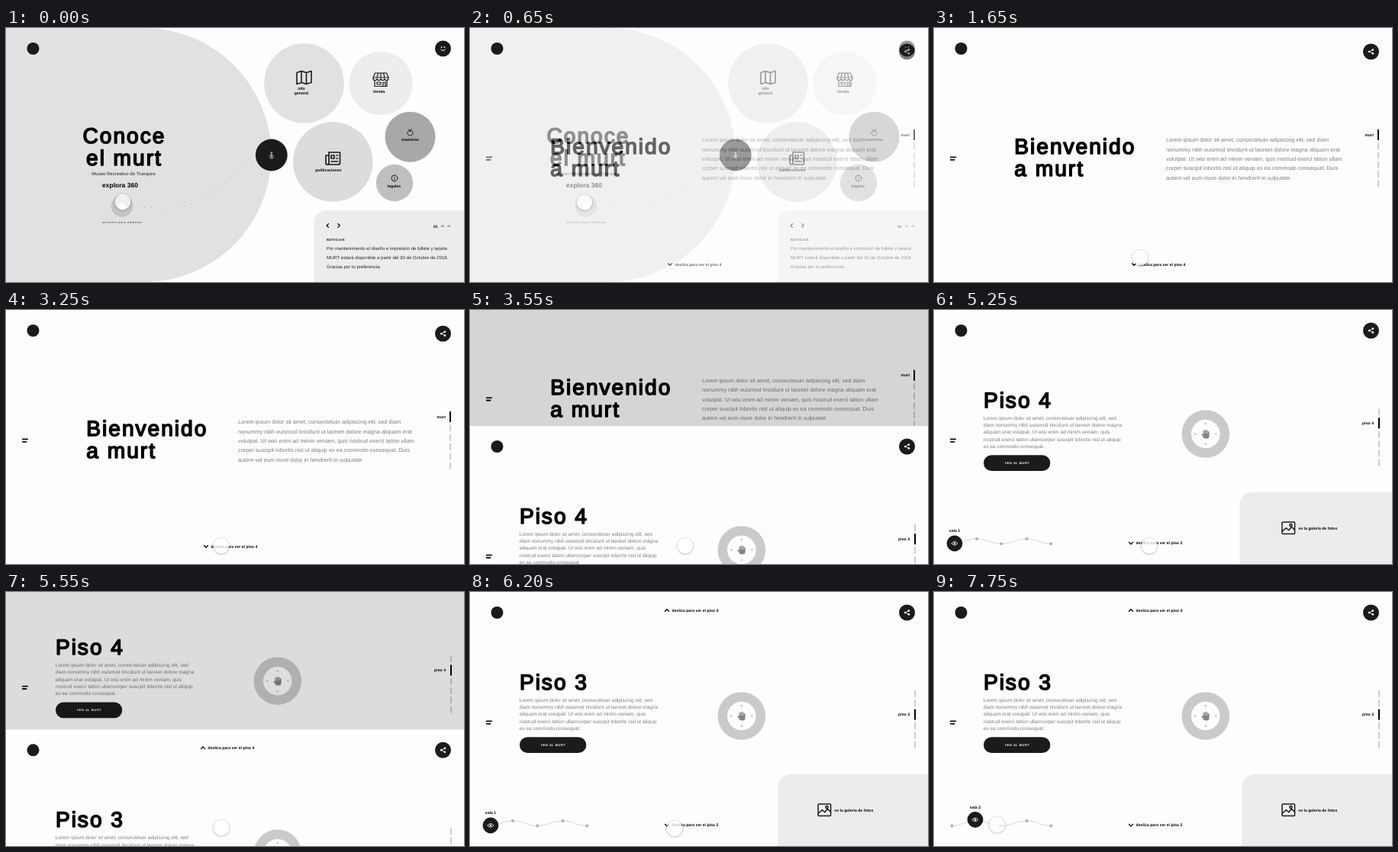
These frames come from a looping animation (600 px wide and 333 px high, 8000 ms). An HTML page with a canvas:

```html
<!DOCTYPE html>
<html lang="es">
<head>
<meta charset="utf-8">
<title>Museo</title>
<style>
html, body { margin: 0; width: 100%; height: 100%; overflow: hidden; background: #fdfdfd; }
canvas { display: block; width: 600px; height: 333px; }
</style>
</head>
<body>
<canvas id="stage"></canvas>
<script>
const W = 600, H = 333, LOOP = 8000, STEP = 50;
const INK = '#1c1a1b', PAPER = '#fdfdfd', PANEL = '#ececec';
const canvas = document.getElementById('stage');
const ctx = canvas.getContext('2d');
const layer = document.createElement('canvas');
const dpr = window.devicePixelRatio || 1;
canvas.width = layer.width = W * dpr;
canvas.height = layer.height = H * dpr;

const clamp = v => Math.max(0, Math.min(1, v));
const span = (t, start, length) => clamp((t - start) / length);
const mix = (a, b, p) => a + (b - a) * p;
const quint = p => p < .5 ? 16 * p ** 5 : 1 - 16 * (1 - p) ** 5;
const smooth = p => p * p * (3 - 2 * p);

function disc(x, y, r, color) {
  ctx.fillStyle = color;
  ctx.beginPath();
  ctx.arc(x, y, r, 0, Math.PI * 2);
  ctx.fill();
}

function box(x, y, w, h, radius, color) {
  ctx.fillStyle = color;
  ctx.beginPath();
  ctx.roundRect(x, y, w, h, radius);
  ctx.fill();
}

function line(path, x, y, color = INK, width = 1.4) {
  ctx.save();
  ctx.translate(x, y);
  ctx.strokeStyle = color;
  ctx.lineWidth = width;
  ctx.lineCap = ctx.lineJoin = 'round';
  ctx.stroke(new Path2D(path));
  ctx.restore();
}

// Text is laid out large and scaled down to keep fractional advances.
function text(str, x, y, size, { weight = 700, color = '#000', align = 'left', gap = 0, round = 0 } = {}) {
  ctx.save();
  ctx.translate(x, y);
  ctx.scale(.1, .1);
  ctx.font = `${weight} ${size * 10}px "Liberation Sans", Arial, sans-serif`;
  ctx.letterSpacing = gap * 10 + 'px';
  ctx.textRendering = 'geometricPrecision';
  ctx.textAlign = align;
  ctx.fillStyle = ctx.strokeStyle = color;
  ctx.fillText(str, 0, 0);
  if (round) {
    ctx.lineJoin = 'round';
    ctx.lineWidth = round * 10;
    ctx.strokeText(str, 0, 0);
  }
  ctx.restore();
}

// A regular face thickened by a round stroke gives soft bold letters.
const title = (str, x, y, align) =>
  text(str, x, y, 28.3, { weight: 400, align, gap: 1.9, round: 1.6 });
const label = (str, x, y, align = 'center') => text(str, x, y, 5.15, { align });
const lines = (rows, x, y, step, size, color) =>
  rows.forEach((row, i) => text(row, x, y + i * step, size, { weight: 400, color }));

function background() {
  ctx.fillStyle = PAPER;
  ctx.fillRect(0, 0, W, H);
}

const logo = () => disc(35.5, 27, 8, INK);

function menu() {
  line('M0 0H6.4', 21.8, 169.4, '#111', 1.8);
  line('M0 0H4.8', 21.8, 172.8, '#111', 1.8);
}

function shareButton(y) {
  const x = 572.5;
  disc(x, y, 10.5, INK);
  line('M2.4-2.4L-2.4 0L2.4 2.4', x, y, '#fff', .9);
  for (const [dx, dy] of [[2.4, -2.4], [-2.4, 0], [2.4, 2.4]]) disc(x + dx, y + dy, 1.3, '#fff');
}

function progressBar(x, y, active, name) {
  for (let i = 0; i < 6; i++) {
    const on = i === active;
    const height = on ? 14 : 8.8;
    ctx.fillStyle = on ? '#000' : '#9b9b9b';
    ctx.fillRect(x - (on ? 1 : .5), y, on ? 2 : 1, height);
    if (on) label(name, 576, y + 8.6, 'right');
    y += height + 3.5;
  }
}

function swipeHint(x, y, dir, floor) {
  line(`M-2.5 ${-1.3 * dir}L0 ${1.3 * dir}L2.5 ${-1.3 * dir}`, x, y, '#000', 1.3);
  label('desliza para ver el piso ' + floor, x + 6.6, y + 1.6, 'left');
}

function homeIcons() {
  line('M-9.5-6.5L-3.5-8.5L3-6.5L9.5-8.5V6.5L3 8.5L-3.5 6.5L-9.5 8.5ZM-3.5-8.5V6.5M3-6.5V8.5', 390.5, 65, INK, 1.6);
  line('M-7.5-9H7.5L10-3V-1.5A2.5 2 0 0 1 5-1.5A2.5 2 0 0 1 0-1.5A2.5 2 0 0 1-5-1.5A2.5 2 0 0 1-10-1.5V-3Z'
    + 'M-10-3H10M-3.5-9L-5-3M3.5-9L5-3M0-9V-3M-8 1V8.5H8V1M-5 3H0V6H-5ZM3 8V3H6V8', 491, 68, INK, 1.2);
  line('M-5.5-8H9V6A2 2 0 0 1 7 8H-7.5A2 2 0 0 1-9.5 6V-4H-5.5ZM-5.5-4V6A2 2 0 0 1-7.5 8'
    + 'M-2.5-4H1.5V0H-2.5ZM4.5-4H6M4.5 0H6M-2.5 4H6', 428.5, 171, INK, 1.7);
  line('M0-1.6C-2-3-3.6-1.2-3.5 .8C-3.3 3-1.5 4.4 0 3.6C1.5 4.4 3.3 3 3.5 .8C3.6-1.2 2-3 0-1.6C0-3 .7-4 2-4.2M0-2.6L-2.4-4', 529.5, 137, INK, 1);
  line('M4 0A4 4 0 1 1-4 0A4 4 0 1 1 4 0M0-.3V2M0-1.9V-1.8', 509, 197, INK, 1);
}

function home() {
  background();
  ctx.fillStyle = '#e0e1e3';
  ctx.fillRect(0, 0, 181, H);
  disc(181, 166.5, 166.5, '#e0e1e3');
  logo();
  disc(572.5, 27, 10.5, INK);
  line('M-2.6 1A2.8 2.8 0 0 0 2.6 1', 572.5, 27, '#fff', 1);
  disc(570.6, 25.2, .9, '#fff');
  disc(574.4, 25.2, .9, '#fff');

  disc(390.5, 72.5, 52.3, '#e0e1e3');
  disc(491, 72.5, 41.7, '#ededed');
  disc(428.3, 175.5, 52.3, '#dcdcdc');
  disc(529.5, 142.7, 33, '#a8a8a8');
  disc(509, 203, 24.2, '#bebfbf');
  homeIcons();
  label('info', 387, 81);
  label('general', 387, 87);
  label('tienda', 488.7, 84.8);
  label('publicaciones', 422.3, 187.6);
  label('maestros', 529.5, 148.4);
  label('legales', 508.5, 208.8);

  ctx.save();
  ctx.setLineDash([0, 8.8]);
  line('M173 233C230 243 262 228 288 202C300 190 310 182 328 178', 0, 0, '#a2a2a4', 1.1);
  ctx.restore();
  disc(347.8, 166.5, 20.9, INK);
  line('M0-1.6V1L-1.8 4H1.8L0 1M-3 1.8L0-1.6L3 1.8M.8-3.4A.8 .8 0 1 1-.8-3.4A.8 .8 0 1 1 .8-3.4', 347.8, 166.8, '#fff', .7);

  title('Conoce', 154.9, 151, 'center');
  title('el murt', 154.9, 180, 'center');
  text('Museo Recreativo de Trueques', 154, 193, 6, { weight: 400, color: '#222', align: 'center' });
  text('explora 360', 149.5, 209.4, 8.5, { align: 'center' });
  disc(152, 233.5, 14.3, '#c3c4c6');
  disc(152.5, 234, 4.8, '#fff');
  text('arrastra para empezar', 152.5, 255.6, 4, { color: '#68686a', align: 'center', gap: .5 });

  box(403.5, 239, 197, 95, [16, 0, 0, 0], PANEL);
  line('M1.2-2.4L-1.2 0L1.2 2.4', 421.3, 259, '#000', 1.3);
  line('M-1.2-2.4L1.2 0L-1.2 2.4', 436, 259, '#000', 1.3);
  text('01', 560, 261.6, 5);
  text('02', 570, 261.2, 3.5, { color: '#555' });
  text('03', 578.4, 261.2, 3.5, { color: '#555' });
  text('NOTICIAS', 420, 278.6, 4.2, { gap: .5 });
  lines(['Por mantenimiento el diseño e impresión de billete y tarjeta',
    'MURT estará disponible a partir del 30 de Octubre de 2018.',
    'Gracias por tu preferencia.'], 420, 291.2, 11.7, 6.02, '#222');
}

function welcome() {
  background();
  logo();
  menu();
  shareButton(31);
  title('Bienvenido', 105.3, 165.2);
  title('a murt', 105.3, 194.2);
  lines(['Lorem ipsum dolor sit amet, consectetuer adipiscing elit, sed diam',
    'nonummy nibh euismod tincidunt ut laoreet dolore magna aliquam erat',
    'volutpat. Ut wisi enim ad minim veniam, quis nostrud exerci tation ullam',
    'corper suscipit lobortis nisl ut aliquip ex ea commodo consequat. Duis',
    'autem vel eum iriure dolor in hendrerit in vulputate'], 304, 149.2, 12.4, 7.3, '#7e7e7e');
  progressBar(582, 133, 0, 'murt');
  swipeHint(262, 310, 1, 4);
}

function tourDial() {
  const x = 355.8, y = 162.5;
  disc(x, y, 31.3, '#c9cacb');
  disc(x, y, 18.8, '#fff');
  for (let i = 0; i < 4; i++) {
    ctx.save();
    ctx.translate(x, y);
    ctx.rotate(i * Math.PI / 2);
    ctx.fillStyle = '#777';
    ctx.fill(new Path2D('M13-1.3L14.5 0L13 1.3Z'));
    ctx.restore();
  }
  line('M-2.4 1V-3.6M-.3 0V-5M1.8 0V-4.4M3.9 1V-2.8M-4.6 .8L-2.4 3.2', x, y, '#858585', 1.6);
  box(x - 3.2, y - .5, 7.9, 6.4, [0, 0, 3, 3], '#858585');
}

function roomPath(p, room) {
  line('M23.5 306.5C36 306.5 42 300 56 300S74 306.5 88 306.5S107 300 121.5 300S139 306.5 153 306.5', 0, 0, '#d2d2d2', .9);
  [23.5, 56, 88.3, 121.5, 153.3].forEach((x, i) => disc(x, i % 2 ? 300 : 306.5, 2.1, '#b2b2b2'));
  const x = mix(27, 54, p), y = mix(306, 298.5, p);
  disc(x, y, 10.4, INK);
  line('M-3.8 0Q0-4.8 3.8 0Q0 4.8-3.8 0Z', x, y, '#fff', .9);
  disc(x, y, 1.2, '#fff');
  label('sala ' + room, x, y - 14.6);
}

function floorPage(floor, move = 0) {
  background();
  logo();
  menu();
  shareButton(27);
  title('Piso ' + floor, 64.9, 128.1);
  lines(['Lorem ipsum dolor sit amet, consectetuer adipiscing elit, sed',
    'diam nonummy nibh euismod tincidunt ut laoreet dolore magna',
    'aliquam erat volutpat. Ut wisi enim ad minim veniam, quis',
    'nostrud exerci tation ullamcorper suscipit lobortis nisl ut aliquip',
    'ex ea commodo consequat.'], 64.8, 144.1, 9.15, 6.5, '#7e7e7e');
  box(65, 190.3, 87.3, 20.7, 10.35, INK);
  text('VEN AL MURT', 109, 202.2, 4, { color: '#fff', align: 'center', gap: .5 });
  tourDial();
  progressBar(583, 129, 5 - floor, 'piso ' + floor);
  if (floor === 3) swipeHint(258, 24, -1, 4);
  swipeHint(258, 305.8, 1, floor - 1);
  roomPath(move, move > .5 ? 2 : 1);

  const left = floor === 4 ? 400.3 : 403.5;
  box(left, 239, W - left + 1, 95, [16, 0, 0, 0], PANEL);
  line('M-7.3-7.7H7.3A1 1 0 0 1 8.3-6.7V6.7A1 1 0 0 1 7.3 7.7H-7.3A1 1 0 0 1-8.3 6.7V-6.7A1 1 0 0 1-7.3-7.7Z'
    + 'M-8 4.5L-3 0L.5 3L4-1.5L8 2.5M4.8-3.8A1.6 1.6 0 1 1 1.6-3.8A1.6 1.6 0 1 1 4.8-3.8', 464.3, 285.8, INK, 1.5);
  label('ve la galeria de fotos', 477.3, 287.7, 'left');
}

function slide(from, to, p) {
  ctx.save();
  ctx.translate(0, -.3 * H * p);
  from();
  ctx.restore();
  ctx.fillStyle = `rgba(0,0,0,${.285 * p})`;
  ctx.fillRect(0, 0, W, H);
  ctx.save();
  ctx.translate(0, H * (1 - p));
  to();
  ctx.restore();
}

function crossfade(from, to, p) {
  from();
  if (!p) return;
  layer.getContext('2d').drawImage(canvas, 0, 0);
  to();
  ctx.globalAlpha = 1 - p;
  ctx.drawImage(layer, 0, 0, W, H);
  ctx.globalAlpha = 1;
}

// time, x, y
const route = [
  [0, 153, 228], [50, 151.5, 228], [400, 150, 228.5], [1080, 150, 228.5],
  [1200, 185, 252], [1300, 245, 288], [1400, 269.7, 301], [1640, 270, 301],
  [1920, 274.5, 305], [2140, 275, 305.5], [2260, 277, 307], [2940, 277, 307],
  [3200, 282, 309], [6170, 282, 309], [6200, 268, 310], [6300, 215, 312],
  [6450, 120, 309], [6600, 72, 305], [6750, 59, 303], [7200, 59, 303],
  [7400, 75, 303.5], [7550, 81.5, 304.3], [7690, 81.5, 304.3], [7750, 82.5, 305.2], [LOOP, 82.5, 305.2]
];

function cursor(t) {
  const i = route.findIndex(k => k[0] > t);
  const [t0, x0, y0] = route[i - 1], [t1, x1, y1] = route[i];
  const p = (t - t0) / (t1 - t0);
  const x = mix(x0, x1, p), y = mix(y0, y1, p);
  const glow = ctx.createRadialGradient(x, y + .6, 9, x, y + .6, 12.6);
  glow.addColorStop(0, 'rgba(0,0,0,.22)');
  glow.addColorStop(1, 'rgba(0,0,0,0)');
  ctx.fillStyle = glow;
  ctx.beginPath();
  ctx.arc(x, y, 14, 0, Math.PI * 2);
  ctx.arc(x, y, 10.2, 0, Math.PI * 2, true);
  ctx.fill();
  disc(x, y, 10.3, 'rgba(255,255,255,.74)');
}

function draw(t) {
  ctx.setTransform(dpr, 0, 0, dpr, 0, 0);
  const toWelcome = span(t, 520, 230);
  const toFour = quint(span(t, 3336.2, 420));
  const toThree = quint(span(t, 5343.6, 420));
  if (toWelcome < 1) {
    crossfade(home, welcome, toWelcome);
  } else if (toFour < 1) {
    toFour ? slide(welcome, () => floorPage(4), toFour) : welcome();
  } else if (toThree < 1) {
    toThree ? slide(() => floorPage(4), () => floorPage(3), toThree) : floorPage(4);
  } else {
    floorPage(3, smooth(span(t, 6880, 400)));
  }
  cursor(t);
}

// The picture advances in fixed steps, with a little slack for timer rounding.
let start;
function tick(now) {
  start ??= now;
  draw(Math.floor((now - start + 4) / STEP) * STEP % LOOP);
  requestAnimationFrame(tick);
}
draw(0);
requestAnimationFrame(tick);
</script>
</body>
</html>
```
